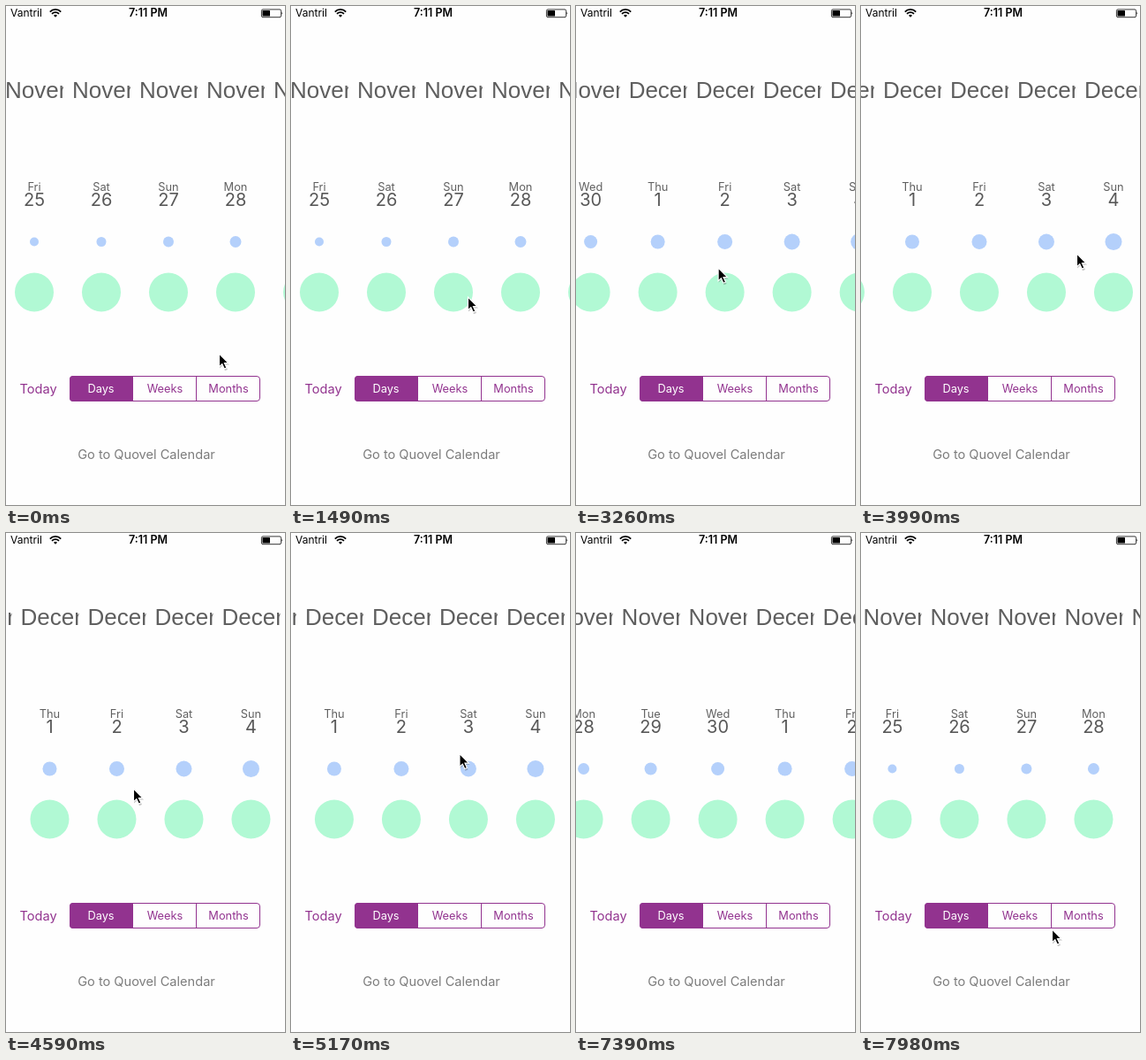
An HTML page for the animation above (8000 ms loop, 316 by 564 pixels).

```html
<!DOCTYPE html>
<html lang="en">
<head>
<meta charset="utf-8">
<title>Calendar strip</title>
<style>
  html, body { margin: 0; width: 100%; height: 100%; overflow: hidden; background: #fefefe; }
  svg { display: block; }
  body > svg { width: 100%; height: 100%; }
  text { font-family: Inter, "Open Sans", sans-serif; }
  .mid { text-anchor: middle; }
  .month { font: 26px "Liberation Sans", Arial, sans-serif; fill: #5e5e5e; }
  .weekday { font-size: 12.8px; fill: #606060; }
  .date { font-size: 20px; fill: #585858; }
  .status { font-size: 12px; fill: #000; }
  .clock { font-size: 12.5px; font-weight: 600; }
  .action { font-size: 14.6px; fill: #92338f; }
  .segment { font-size: 12.8px; fill: #92338f; }
  .segment.on { fill: #fff; }
  .link { font-size: 14.6px; fill: #7c7c7c; }
</style>
</head>
<body>
<svg viewBox="0 0 316 564">
  <rect width="316" height="564" fill="#fefefe"/>

  <text class="status" x="5" y="12.4">Vantril</text>
  <g fill="none" stroke="#000" stroke-width="1.8">
    <path d="M49.8 6.6a8.6 8.6 0 0 1 12.4 0M52 8.9a5.6 5.6 0 0 1 8 0"/>
    <path d="M54 10.7a2.8 2.8 0 0 1 4 0L56 12.7z" fill="#000" stroke="none"/>
  </g>
  <text class="status clock mid" x="161" y="12.4">7:11 PM</text>
  <rect x="289.4" y="3.9" width="22.2" height="8.8" rx="1.6" fill="none" stroke="#000" stroke-width=".8"/>
  <rect x="290.5" y="5" width="8.5" height="6.6" rx=".6"/>
  <path d="M312.5 6.8q1.6 1.5 0 3z"/>

  <g id="strip"></g>

  <text class="action" x="15.5" y="437.6">Today</text>
  <rect x="72.5" y="418.5" width="215" height="28" rx="3.5" fill="none" stroke="#92338f"/>
  <path d="M144 418H76a4 4 0 0 0-4 4v21a4 4 0 0 0 4 4h68z" fill="#92338f"/>
  <path d="M215.5 418.5v28" stroke="#92338f"/>
  <text class="segment on mid" x="107.5" y="437">Days</text>
  <text class="segment mid" x="180" y="437">Weeks</text>
  <text class="segment mid" x="252" y="437">Months</text>
  <text class="link mid" x="159" y="512.3">Go to Quovel Calendar</text>

  <g id="cursor">
    <path d="M1 1.5v15l3.4-3 2.6 5.7 3-1.3-2.5-5.4h4.6z" opacity=".22"/>
    <path d="M.5 0v14.6l3.3-3 2.5 5.5 2.6-1.2-2.5-5.3h4.5z" stroke="#fff" stroke-width="1.1"/>
  </g>
</svg>
<script>
const LOOP = 8000, FIRST_TICK = 1041, TICK = 147.4;
const PITCH = 76, CELL = 66;
const SCROLL_END = 434;
const WEEKDAYS = ["Fri", "Sat", "Sun", "Mon", "Tue", "Wed", "Thu"];

// Each flick glides to its goal with exponential decay; times are in ticks.
const FLICKS = [
  { at: 4, to: 59, decay: 0.35 },
  { at: 10, to: SCROLL_END, decay: 2.2 },
  { at: 42, to: -48, decay: 2.1 }
];

// Two drags in a row stretch the strip past its end.
const PULL = { at: 20, ticks: 6, count: 2, stretch: 6.9 };

const CURSOR_START = { x: 241, y: 393 };
const CURSOR_MOVES = [
  { at: -1, ticks: 4, x: 200, y: 329 },
  { at: 4, ticks: 2, x: 162, y: 329 },
  { at: 7, ticks: 2, x: 258, y: 304 },
  { at: 10, ticks: 3, x: 140, y: 300 },
  { at: 13, ticks: 7, x: 244, y: 280 },
  { at: 20, ticks: 4, x: 144, y: 289 },
  { at: 24, ticks: 8, x: 237, y: 210 },
  { at: 33, ticks: 4, x: 284, y: 235 },
  { at: 37, ticks: 5, x: 113, y: 255 },
  { at: 42, ticks: 1, x: 340, y: 300 },
  { at: 43, ticks: 4, x: 216, y: 448 }
];

const strip = document.getElementById("strip");
const cursor = document.getElementById("cursor");
const clamp = p => Math.min(1, Math.max(0, p));
const smooth = p => p * p * (3 - 2 * p);
const mix = (a, b, p) => a + (b - a) * p;

function cell(i) {
  const november = i < 6;
  return `<g transform="translate(${32 + PITCH * i} 0)">
    <svg x="${-CELL / 2}" y="80" width="${CELL}" height="34" overflow="hidden">
      <text class="month" y="24.4">${november ? "November" : "December"}</text>
    </svg>
    <text class="weekday mid" y="208.6">${WEEKDAYS[i % 7]}</text>
    <text class="date mid" y="226">${november ? 25 + i : i - 5}</text>
    <circle cy="266.5" r="${5 + i / 2}" fill="#b4d0fb"/>
    <circle cy="323.5" r="22" fill="#b1f9d4"/>
  </g>`;
}

function scrollAt(tick) {
  const glide = FLICKS.reduce((from, { at, to, decay }) =>
    mix(to, from, Math.exp(-Math.max(0, tick - at) / decay)), 0);
  const turns = clamp((tick - PULL.at) / (PULL.ticks * PULL.count)) * PULL.count;
  return glide + PULL.stretch * Math.sin(Math.PI * turns) ** 2;
}

function cursorAt(tick) {
  return CURSOR_MOVES.reduce((from, { at, ticks, x, y }) => {
    const p = smooth(clamp((tick - at) / ticks));
    return { x: mix(from.x, x, p), y: mix(from.y, y, p) };
  }, CURSOR_START);
}

const start = performance.now();

function draw() {
  const time = (performance.now() - start) % LOOP;
  // The picture advances in hard steps, one per tick.
  const tick = Math.max(-1, Math.floor((time - FIRST_TICK) / TICK));
  const { x, y } = cursorAt(tick);
  strip.setAttribute("transform", `translate(${-scrollAt(tick)} 0)`);
  cursor.setAttribute("transform", `translate(${x} ${y})`);
  requestAnimationFrame(draw);
}

strip.innerHTML = Array.from({ length: 10 }, (_, i) => cell(i)).join("");
draw();
</script>
</body>
</html>
```
